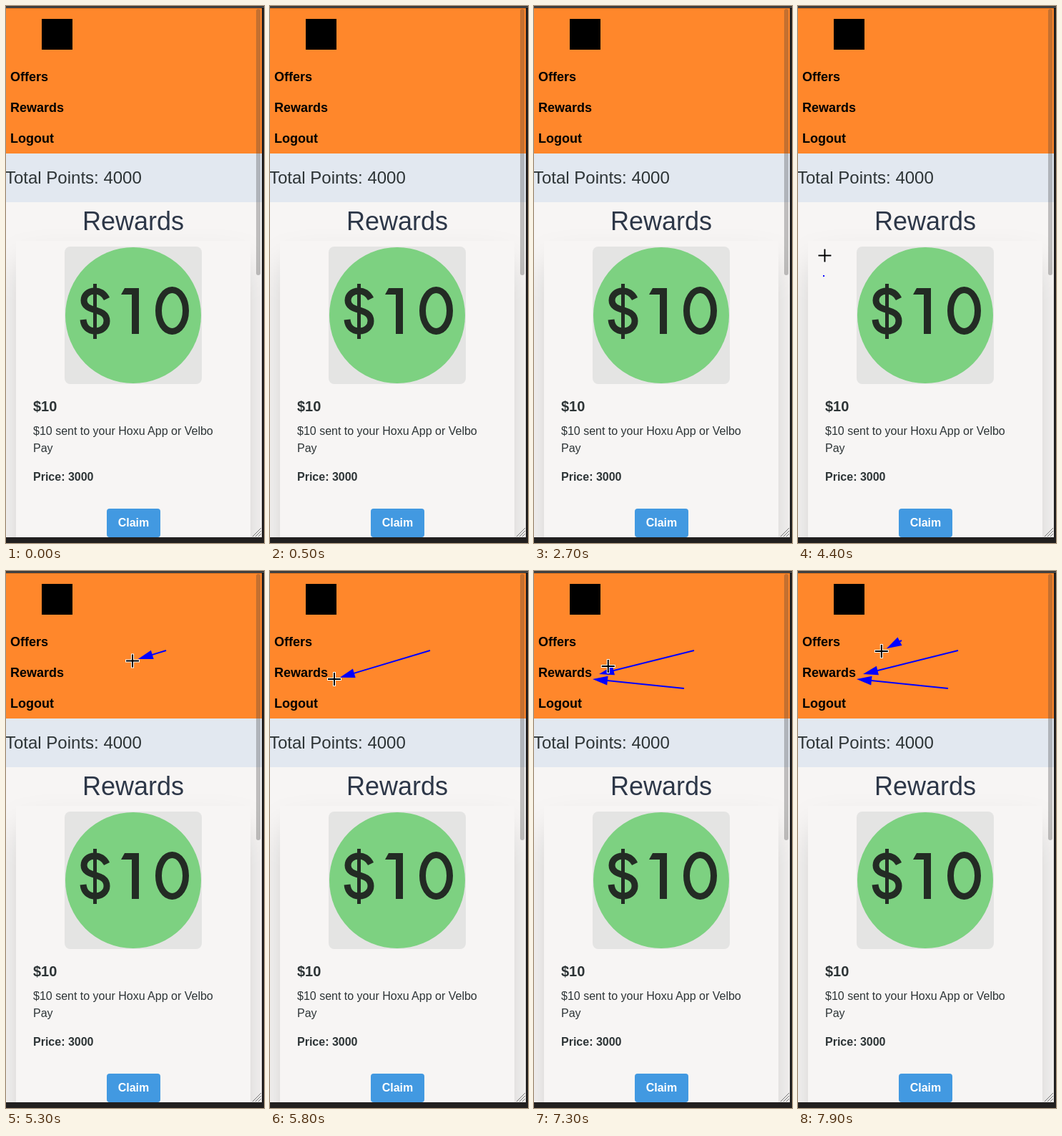
Write an HTML page that moves like this. It is 361 px wide and 750 px high and loops after 8000 ms.

```html
<!DOCTYPE html>
<html lang="en">
<head>
<meta charset="utf-8">
<title>Rewards</title>
<style>
  html, body { margin: 0; width: 100%; height: 100%; overflow: hidden; background: #211f1f; }
  body { position: relative; }
  svg, span { position: absolute; }
  svg { left: 0; top: 0; width: 361px; height: 750px; }
  span { white-space: nowrap; font-family: "Liberation Sans", Arial, sans-serif; }
  .ink { fill: none; stroke: #232b24; stroke-width: 9; }
</style>
</head>
<body>
<svg viewBox="0 0 361 750">
  <defs>
    <filter id="blur" x="-50%" y="-50%" width="200%" height="200%"><feGaussianBlur stdDeviation="25"/></filter>
    <clipPath id="page"><rect y="3" width="358" height="739"/></clipPath>
  </defs>
  <rect width="361" height="750" fill="#211f1f"/>
  <rect y="1" width="361" height="1" fill="#6b6b6b"/>

  <g clip-path="url(#page)">
    <rect width="358" height="742" fill="#f7f5f4"/>
    <rect x="26" y="365" width="304" height="440" fill-opacity=".25" filter="url(#blur)"/>
    <rect x="14" y="328" width="328" height="440" fill="#f7f5f4"/>
    <rect width="358" height="206" fill="#ff872b"/>
    <rect y="206" width="358" height="68" fill="#e2e8f0"/>
    <rect x="50" y="18" width="43" height="43"/>

    <rect x="82" y="336" width="192" height="192" rx="8" fill="#e4e4e3"/>
    <circle cx="178" cy="432" r="95" fill="#7dd181"/>
    <path class="ink" d="M141 409C137 401 131 398 124 398C115 398 109 404 109 411C109 429 141 420 141 440C141 448 134 454 125 454C115 454 109 448 108 438"/>
    <path d="M122 388h5v77h-5zM166 394h20v64h-10v-55h-15z" fill="#232b24"/>
    <ellipse class="ink" cx="232.500" cy="425.500" rx="19" ry="29"/>
    <rect x="141" y="702" width="75" height="40" rx="4" fill="#4299e1"/>

    <rect x="350" y="4" width="6" height="372" rx="3" fill="#3c3c3c" fill-opacity=".3"/>
    <path d="M345 741l12-12M349 741l8-8M353 741l4-4" stroke="#777"/>
  </g>
</svg>

<div id="labels"></div>

<svg viewBox="0 0 361 750">
  <g id="guide" fill="#70128f">
    <rect x="142" y="3" width="1" height="747"/>
    <circle cx="142.500" cy="354.500" r="6"/>
    <circle cx="142.500" cy="752" r="6"/>
    <circle cx="280" cy="752" r="6"/>
  </g>
  <g id="arrows" fill="#00f" stroke="#00f"></g>
  <rect id="dot" width="2" height="2" fill="#00f"/>
  <g id="cursor" fill="none">
    <path d="M-10 0H10M0-10V10" stroke="#fff" stroke-width="4"/>
    <path d="M-9 0H9M0-9V9" stroke="#000" stroke-width="2"/>
  </g>
</svg>
<script>
const LOOP = 8000, STEP = 100;
const DRAG = 500;     // time of one arrow drag
const GAP = 8;        // distance from cursor to arrow tip while dragging
const DOT_LAG = 50;

const linear = u => u;
const easeOut = u => 1 - (1 - u) ** 2;

// Pointer moves; an optional control point bends the way
const moves = [
  { at: 2300, time: 1, from: [48, 736], to: [48, 736], ease: linear },
  { at: 4380, time: 720, from: [36, 377], bend: [60, -145], to: [226, 111], ease: linear },
  { at: 5200, time: DRAG, from: [226, 111], to: [90, 151], ease: easeOut },
  { at: 6100, time: 400, from: [90, 151], to: [210, 164], ease: easeOut },
  { at: 6520, time: DRAG, from: [210, 164], to: [80, 152], ease: easeOut },
  { at: 7200, time: 500, from: [80, 152], to: [146, 99], ease: easeOut },
  { at: 7800, time: DRAG, from: [146, 99], to: [65, 135], ease: easeOut }
];
const arrows = [
  { start: [224, 111], end: [91, 144], from: 5300, until: 5900 },
  { start: [210, 164], end: [82, 151], from: 6600, until: 7000 },
  { start: [145, 97], end: [65, 135], from: 7900, until: LOOP }
];

const $ = id => document.getElementById(id);
const show = (el, on) => el.setAttribute("display", on ? "inline" : "none");
const move = (el, x, y) => el.setAttribute("transform", `translate(${x} ${y})`);

function label(text, x, baseline, size, { bold = false, color = "#2d3436", width } = {}) {
  const ascent = Math.round(size * 0.905), descent = Math.round(size * 0.212);
  const el = $("labels").appendChild(document.createElement("span"));
  el.textContent = text;
  Object.assign(el.style, {
    left: x + "px", top: baseline - ascent + "px", lineHeight: ascent + descent + "px",
    fontSize: size + "px", fontWeight: bold ? 700 : 400, color
  });
  if (width) Object.assign(el.style, { width: width + "px", textAlign: "center" });
}

["Offers", "Rewards", "Logout"].forEach((text, i) =>
  label(text, 6, 105 + 43 * i, 18, { bold: true, color: "#000" }));
label("Total Points: 4000", -1, 248, 24);
label("Rewards", 0, 313, 36, { color: "#2d3748", width: 356 });
label("$10", 38, 566, 20, { bold: true });
label("$10 sent to your Hoxu App or Velbo", 38, 599, 16);
label("Pay", 38, 623, 16);
label("Price: 3000", 38, 663, 16, { bold: true });
label("Claim", 141, 727, 16, { bold: true, color: "#fff", width: 75 });

function pointer(t) {
  const { at, time, from, to, bend, ease } = moves.findLast(m => m.at <= t) ?? moves[0];
  const u = ease(Math.min(1, Math.max(0, (t - at) / time)));
  return from.map((a, i) => {
    const b = to[i], c = bend ? bend[i] : (a + b) / 2;
    return a * (1 - u) ** 2 + 2 * c * u * (1 - u) + b * u * u;
  });
}

function addPart(parent, tag, attrs) {
  const el = document.createElementNS("http://www.w3.org/2000/svg", tag);
  for (const name in attrs) el.setAttribute(name, attrs[name]);
  return parent.appendChild(el);
}

for (const a of arrows) {
  a.group = addPart($("arrows"), "g", {});
  a.line = addPart(a.group, "line", { x1: a.start[0], y1: a.start[1], "stroke-width": 2 });
  a.head = addPart(a.group, "path", { d: "M0 0L21-6.500V6.500Z", stroke: "none" });
}

function drawArrow(a, t) {
  show(a.group, t >= a.from);
  const dragging = t < a.until;
  const [px, py] = dragging ? pointer(t) : a.end;
  const angle = Math.atan2(a.start[1] - py, a.start[0] - px);
  const along = d => [px + d * Math.cos(angle), py + d * Math.sin(angle)];
  const [x, y] = along(dragging ? GAP : 0);
  const [x2, y2] = along(GAP + 10);
  a.line.setAttribute("x2", x2);
  a.line.setAttribute("y2", y2);
  a.head.setAttribute("transform", `translate(${x} ${y}) rotate(${angle * 180 / Math.PI})`);
}

function render(time) {
  const t = Math.floor(time % LOOP / STEP) * STEP;
  show($("guide"), t >= 2300 && t < 2400);
  show($("cursor"), t >= 4400 || (t >= 2300 && t < 2700));
  move($("cursor"), ...pointer(t));
  show($("dot"), t >= 4400 && t < 5100);
  const [x, y] = t === 4400 ? moves[1].from : pointer(t - DOT_LAG);
  move($("dot"), x - 1, y - 1);
  for (const a of arrows) drawArrow(a, t);
}

let start;
function tick(now) {
  start ??= now;
  render(now - start);
  requestAnimationFrame(tick);
}
render(0);
requestAnimationFrame(tick);
</script>
</body>
</html>
```
